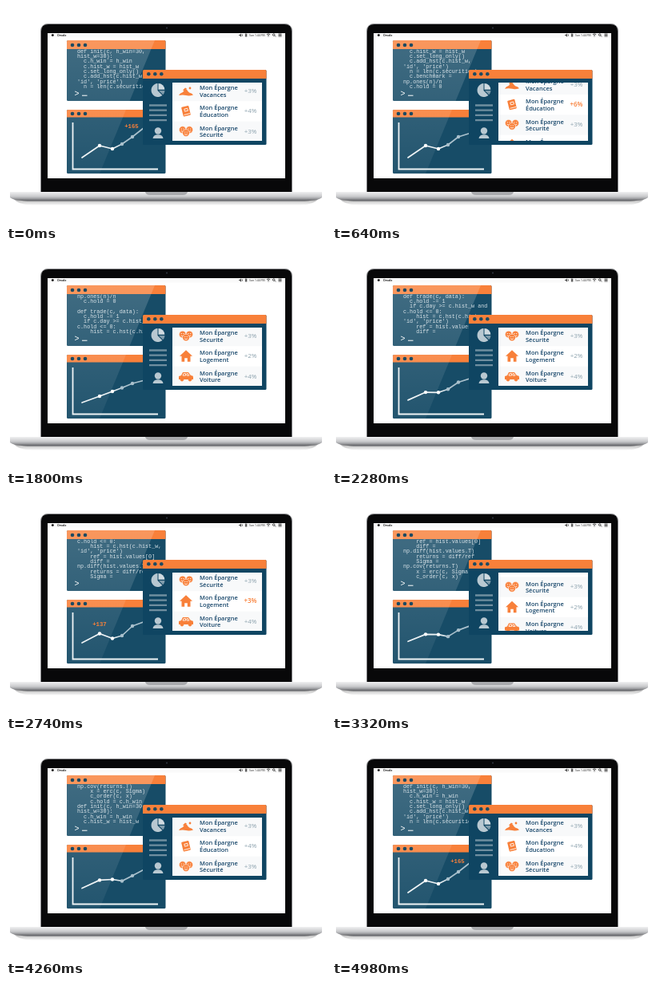
Write an HTML page that moves like this. It is 400 px wide and 272 px high and loops after 5000 ms.

```html
<!DOCTYPE html>
<html lang="fr">
<head>
<meta charset="utf-8">
<title>Laptop</title>
<style>
  html, body { margin: 0; width: 100%; height: 100%; overflow: hidden; background: #fff; }
  svg { display: block; width: 400px; height: 272px; }
  .bar { fill: #f8803a; }
  .body { fill: #174c67; }
  .dot { fill: #1d4a62; }
  .code { font: 6.75px "Liberation Mono", monospace; fill: #d3dfe5; white-space: pre; }
  .tag { font: 700 7.3px "Liberation Mono", monospace; fill: #f8803a; text-anchor: middle; }
  .name { font: 600 7.5px "Open Sans", sans-serif; fill: #17466a; }
  .rate { font: 8px "Open Sans", sans-serif; fill: #8ba1ad; text-anchor: middle; }
  .rate.hot { fill: #f8803a; font-weight: 600; }
  .menu { font: 3.4px "Open Sans", sans-serif; fill: #222; }
  .icon { fill: #f8803a; }
  .cut { fill: none; stroke: #fff; stroke-width: .8; }
</style>
</head>
<body>
<svg viewBox="0 0 400 272">
  <defs>
    <linearGradient id="metal" x2="0" y2="1">
      <stop offset="0" stop-color="#f0f0f1"/>
      <stop offset=".5" stop-color="#c9cacc"/>
      <stop offset=".7" stop-color="#a5a6a9"/>
      <stop offset="1" stop-color="#55565a"/>
    </linearGradient>
    <linearGradient id="shade" x2="0" y2="1">
      <stop offset="0" stop-color="#777" stop-opacity=".6"/>
      <stop offset="1" stop-color="#777" stop-opacity="0"/>
    </linearGradient>
    <linearGradient id="gloss" x2="0" y2="1">
      <stop offset="0" stop-color="#fff" stop-opacity=".18"/>
      <stop offset="1" stop-color="#fff" stop-opacity=".05"/>
    </linearGradient>
    <linearGradient id="trace" gradientUnits="userSpaceOnUse" x1="134" x2="150" y1="0" y2="0">
      <stop offset="0" stop-color="#eef3f5"/>
      <stop offset="1" stop-color="#a9c0cc"/>
    </linearGradient>
    <clipPath id="codeClip"><rect x="76" y="54.500" width="124" height="64"/></clipPath>
    <clipPath id="listClip"><rect x="208" y="96" width="112" height="73"/></clipPath>
    <clipPath id="glossClip">
      <rect x="76" y="43" width="123.500" height="76"/>
      <rect x="76" y="130" width="123.500" height="80"/>
    </clipPath>
    <g id="dots" class="dot">
      <circle cx="7" cy="0" r="2.300"/><circle cx="15" cy="0" r="2.300"/><circle cx="23" cy="0" r="2.300"/>
    </g>
  </defs>

  <!-- laptop -->
  <path d="M10 242H390Q384 250 360 250H40Q16 250 10 242Z" fill="url(#shade)"/>
  <path d="M43.500 234V32Q43.500 22.500 53 22.500H348Q357.500 22.500 357.500 32V234Z" fill="#080809" stroke="#8c8d90"/>
  <circle cx="201" cy="27.500" r="1" fill="#333a44"/>
  <rect x="52" y="34" width="297" height="182" fill="#fff"/>
  <path d="M5 233H395V240Q390 244.500 368 244.500H32Q10 244.500 5 240Z" fill="url(#metal)"/>
  <path d="M174 233H227Q226 237 221 237H180Q175 237 174 233Z" fill="#a9aaad"/>

  <!-- menu bar -->
  <rect x="52" y="34" width="297" height="5.500" fill="#fafafa"/>
  <circle cx="58.300" cy="36.500" r="1.500" fill="#222"/>
  <text class="menu" x="64" y="37.700" style="font-weight:700">Orvalo</text>
  <text class="menu" x="304" y="37.700">Sun 1:44 PM</text>
  <g fill="none" stroke="#222" stroke-width=".8">
    <path d="M291 36.500h1l1.500-1.300v2.800L292 36.700M295 35.300q1 1.200 0 2.500M299 35.200l2 2.400-1 1v-4l1 1-2 2.300"/>
    <path d="M325.800 35.700q2.200-1.800 4.400 0M326.900 37q1.100-.9 2.200 0M328 37.900v.6"/>
    <circle cx="334.700" cy="36.100" r="1.300"/><path d="M335.700 37.100l1.400 1.400M340.500 35h4M340.500 36.500h4M340.500 38h4"/>
  </g>

  <!-- code window -->
  <rect class="body" x="76" y="43" width="123.500" height="76" rx="1.500"/>
  <path class="bar" d="M76 54V44.500Q76 43 77.500 43H198Q199.500 43 199.500 44.500V54Z"/>
  <g id="code" clip-path="url(#codeClip)"></g>

  <!-- chart window -->
  <rect class="body" x="76" y="130" width="123.500" height="80" rx="1.500"/>
  <path class="bar" d="M76 139.500V131.500Q76 130 77.500 130H198Q199.500 130 199.500 131.500V139.500Z"/>

  <path d="M76 43H186L150 130L117 210H76Z" fill="url(#gloss)" clip-path="url(#glossClip)"/>
  <use href="#dots" x="76" y="49"/>
  <use href="#dots" x="76" y="135"/>
  <text class="code" x="85.500" y="112.500" style="font-size:10px;fill:#fff">&gt;</text>
  <rect id="cursor" x="95" y="111.700" width="6.500" height="1" fill="#fff"/>

  <path d="M83.500 146V204.500H190" fill="none" stroke="#eef3f5" stroke-width="1.800"/>
  <polyline id="line" fill="none" stroke="url(#trace)" stroke-width="1.700" stroke-linejoin="round" stroke-linecap="round"/>
  <g id="marks"></g>
  <text id="low" class="tag" x="117" y="162.500">+137</text>
  <text id="high" class="tag" x="157" y="152.500">+165</text>

  <!-- savings window -->
  <rect x="171" y="80" width="154.500" height="94" rx="1.500" fill="#0f4562"/>
  <path class="bar" d="M171 91V81.500Q171 80 172.500 80H324Q325.500 80 325.500 81.500V91Z"/>
  <use href="#dots" x="171.300" y="85.300"/>
  <g fill="#b8c8d1">
    <path d="M189.500 106V97A8.500 8.500 0 1 0 195.500 112Z"/>
    <path d="M190.500 104.800V97A8 8 0 0 1 198.300 104.800Z" fill="#cfdae0"/>
    <path d="M191 106H198.500A8.500 8.500 0 0 1 196.300 111.300Z" fill="#7f9cac"/>
    <circle cx="190" cy="156.500" r="4.200"/>
    <path d="M183.500 166Q184 161.300 190 161.300T196.500 166Z"/>
  </g>
  <path d="M179 124.500H201M179 130.700H201M179 136.900H201M179 143.100H201" stroke="#6f8e9f" stroke-width="2.300"/>
  <g clip-path="url(#listClip)">
    <rect x="208" y="96" width="112" height="73" fill="#fff"/>
    <g id="list"></g>
  </g>
</svg>

<script>
const LOOP = 5000, PITCH = 25.3;
const $ = id => document.getElementById(id);

function add(parent, tag, attrs, text = '') {
  const el = document.createElementNS('http://www.w3.org/2000/svg', tag);
  for (const key in attrs) el.setAttribute(key, attrs[key]);
  el.textContent = text;
  return parent.appendChild(el);
}

const program = `def init(c, h_win=30,
hist_w=30):
  c.h_win = h_win
  c.hist_w = hist_w
  c.set_long_only()
  c.add_hst(c.hist_w,
'id', 'price')
  n = len(c.securities)
  c.benchmark =
np.ones(n)/n
  c.hold = 0

def trade(c, data):
  c.hold -= 1
  if c.day >= c.hist_w and
c.hold <= 0:
    hist = c.hst(c.hist_w,
'id', 'price')
    ref = hist.values[0]
    diff =
np.diff(hist.values.T)
    returns = diff/ref
    Sigma =
np.cov(returns.T)
    x = erc(c, Sigma)
    c_order(c, x)
    c.hold = c.h_win`.split('\n');

const codeRows = Array.from({ length: 8 }, (_, i) =>
  add($('code'), 'text', { class: 'code', x: 89, y: 58.7 + i * 6.35 }));

// Icons are drawn around their own centre.
const coin = (x, y) => `<circle cx="${x}" cy="${y}" r="4.300" stroke="#fff" stroke-width=".5"/>
  <path class="cut" d="M${x - 2} ${y - 1}h1.300m1.400 0h1.300M${x - 2} ${y + 1.300}q2 1.800 4 0"/>`;
const icons = {
  Vacances: '<path d="M-9 5.500Q-8 3-4 1.500L-1-2Q1-3 2 0L4 2Q8 3 9 5Q4 6.500 0 5.500T-9 5.500Z"/><path d="M-4-1L-1-4L1-3L-2 0Z"/><circle cx="5" cy="-3.500" r="1.400"/>',
  'Éducation': '<g transform="rotate(-14)"><rect x="-4.700" y="-6" width="9.400" height="12" rx="1"/><path class="cut" d="M-3.500 4H4.500M-1.500-3H2.500V0H-1.500Z"/></g>',
  'Sécurité': coin(-4.3, -2) + coin(4.3, -2) + coin(0, 2),
  Logement: '<path d="M0-7.500L8 0H5.500V7H1.800V2.500H-1.800V7H-5.500V0H-8Z"/>',
  Voiture: '<path d="M-9 4V0L-6-1L-4-5H3L6-1Q9-1 9 1V4Z"/><circle cx="-5" cy="4" r="2.300"/><circle cx="5" cy="4" r="2.300"/><path class="cut" d="M-4-1L-3-3.500H-.5V-1ZM1-1V-3.500H2.500L4-1Z"/>'
};
const rates = [3, 4, 3, 2, 4];
const rateEls = Object.keys(icons).map((name, i) => {
  const row = add($('list'), 'g', { transform: `translate(0 ${i * PITCH})` });
  if (i % 2 === 0) add(row, 'rect', { x: 208, y: 94, width: 112, height: PITCH, fill: '#f8f9fa' });
  add(row, 'g', { class: 'icon', transform: 'translate(225 106.500)' }).innerHTML = icons[name];
  add(row, 'text', { class: 'name', x: 242, y: 105.2 }, 'Mon Épargne');
  add(row, 'text', { class: 'name', x: 242, y: 113.8 }, name);
  return add(row, 'text', { class: 'rate', x: 305.5, y: 109 });
});

// Chart heights at a few moments, eased between them.
const moments = [0, 640, 1180, 1800, 2740, 3800, 4880, 5000];
const chart = [
  { x: 95, y: [190, 190, 190, 190, 184, 181, 190, 190] },
  { x: 117, y: [175, 175, 181.5, 182, 172.5, 174, 175, 175] },
  { x: 133, y: [179, 179, 175.5, 176, 178.5, 170, 179, 179] },
  { x: 145, y: [173, 174, 171.5, 171.5, 175, 177, 173, 173] },
  { x: 158, y: [164, 164, 167.5, 166, 163, 172, 164, 164] },
  { x: 177, y: [149, 158, 163, 161, 156, 165, 149, 149] }
];
const marks = chart.slice(1, 5).map((p, i) =>
  add($('marks'), 'circle', { cx: p.x, r: 2.2, fill: i < 2 ? '#fff' : '#a9c0cc' }));

const clamp = v => Math.min(1, Math.max(0, v));
const ease = v => { v = clamp(v); return v * v * (3 - 2 * v); };
const span = (t, from, to) => ease((t - from) / (to - from));

function height(p, t) {
  let i = 0;
  while (t >= moments[i + 1]) i++;
  return p.y[i] + (p.y[i + 1] - p.y[i]) * span(t, moments[i], moments[i + 1]);
}

function setRate(i, value, hot) {
  rateEls[i].textContent = `+${value}%`;
  rateEls[i].classList.toggle('hot', hot);
}

function draw(t) {
  const first = Math.floor(t / LOOP * program.length + .24);
  codeRows.forEach((row, i) => row.textContent = program[(first + i) % program.length]);
  $('cursor').style.opacity = (t * 6 / LOOP + .28) % 1 < .5 ? 1 : 0;

  const ys = chart.map(p => height(p, t));
  $('line').setAttribute('points', chart.map((p, i) => `${p.x},${ys[i]}`).join(' '));
  marks.forEach((m, i) => m.setAttribute('cy', ys[i + 1]));
  $('low').style.opacity = span(t, 2350, 2500) - span(t, 3000, 3150);
  $('high').style.opacity = 1 - span(t, 300, 450) + span(t, 4500, 4650);

  const scroll = 2 * (span(t, 380, 1400) - span(t, 3080, 4080));
  $('list').setAttribute('transform', `translate(0 ${-scroll * PITCH})`);
  rates.forEach((r, i) => setRate(i, r, false));
  if (t >= 300 && t < 1000) setRate(1, 6, true);
  if (t >= 2300 && t < 3100) setRate(3, 3, true);
}

function tick() {
  draw(performance.now() % LOOP);
  requestAnimationFrame(tick);
}
tick();
</script>
</body>
</html>
```
